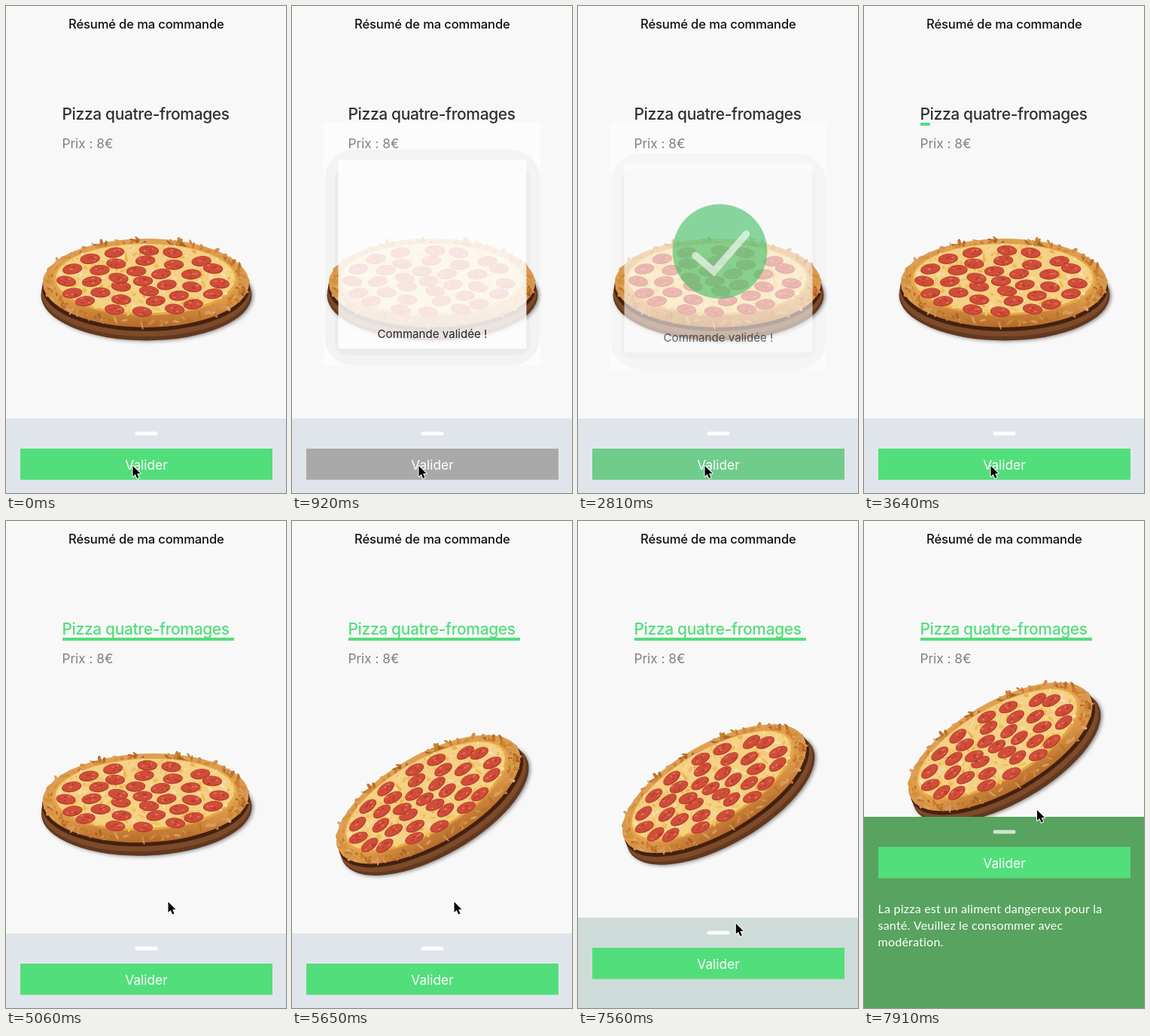
Recreate the animation shown at these times as an HTML page with a canvas. Size 372 by 647 pixels, loop 8 s.

```html
<!DOCTYPE html>
<html lang="fr">
<head>
<meta charset="utf-8">
<title>Résumé de ma commande</title>
<style>
html, body { margin: 0; width: 100%; height: 100%; overflow: hidden; background: #f8f8f8; }
canvas { display: block; }
</style>
</head>
<body>
<canvas id="stage" width="372" height="647"></canvas>
<script>
const ctx = document.getElementById('stage').getContext('2d');
const LOOP = 8000, STEP = 118, LAST_TICK = 67, MAX_LIFT = 155;
const GREEN = [82, 222, 122], GRAY = [169, 169, 169];
const UI = 'Inter, "Liberation Sans", sans-serif';
const TAU = Math.PI * 2;

const clamp = x => Math.max(0, Math.min(1, x));
const ramp = (k, a, b) => clamp((k - a) / (b - a));
const smooth = (k, a, b) => { const x = ramp(k, a, b); return x * x * (3 - 2 * x); };
const mix = (a, b, p) => `rgb(${a.map((v, i) => Math.round(v + (b[i] - v) * p))})`;

function seeded(seed) {
  return () => (seed = (seed * 16807) % 2147483647) / 2147483647;
}

function text(str, x, y, font, color, { align = 'left', spacing = 0 } = {}) {
  ctx.font = font;
  ctx.letterSpacing = spacing + 'px';
  ctx.textAlign = align;
  ctx.fillStyle = color;
  ctx.fillText(str, x, y);
}

function rect(x, y, w, h, color, radius = 0) {
  ctx.fillStyle = color;
  ctx.beginPath();
  ctx.roundRect(x, y, w, h, radius);
  ctx.fill();
}

function ellipse(x, y, rx, ry, color, turn = 0) {
  ctx.fillStyle = color;
  ctx.beginPath();
  ctx.ellipse(x, y, rx, ry, turn, 0, TAU);
  ctx.fill();
}

function drawBoard() {
  ctx.save();
  ctx.shadowColor = 'rgba(0,0,0,.45)';
  ctx.shadowBlur = 5;
  ctx.shadowOffsetX = 2;
  ctx.shadowOffsetY = 1;
  ellipse(186.5, 384, 140, 60.5, '#63381f');
  ctx.restore();
  ellipse(186, 381, 139, 58, '#7d4a2a');
  ellipse(186, 374, 138, 58, '#43210f');
}

function drawCrust(rnd) {
  const crust = ctx.createLinearGradient(0, 309, 0, 427);
  crust.addColorStop(0, '#e0a050');
  crust.addColorStop(0.7, '#dc9848');
  crust.addColorStop(1, '#b56a2a');
  ellipse(186, 368, 137, 59, crust);
  for (let i = 0; i < 170; i++) {
    const a = rnd() * TAU, r = 0.88 + rnd() * 0.11;
    const color = `hsl(${26 + rnd() * 9}, 62%, ${40 + rnd() * 24}%)`;
    ellipse(186 + 137 * r * Math.cos(a), 367 + 59 * r * Math.sin(a), 2 + rnd() * 4, 1 + rnd() * 1.5, color, rnd() * 3);
  }
}

function drawCheese(rnd) {
  ellipse(185, 363, 123, 48, '#e6a647');
  ellipse(185, 362, 119, 46, '#f4d183');
  for (let i = 0; i < 320; i++) {
    const a = rnd() * TAU, r = Math.sqrt(rnd());
    const color = `hsl(${34 + rnd() * 12}, 82%, ${60 + rnd() * 24}%)`;
    ellipse(185 + 118 * r * Math.cos(a), 362 + 46 * r * Math.sin(a), 1.5 + rnd() * 4, 0.8 + rnd() * 1.5, color, rnd() * 3);
  }
}

function drawSlice(x, y, rnd) {
  const turn = (rnd() - 0.5) * 0.3;
  ellipse(x, y + 0.5, 13.2, 6.9, '#b63a2a', turn);
  ellipse(x, y, 12.4, 6.1, '#cf4d39', turn);
  for (let i = 0; i < 5; i++) {
    ellipse(x + (rnd() - 0.5) * 17, y + (rnd() - 0.5) * 8, 2, 1, i % 2 ? '#e0775a' : '#b93c2c');
  }
}

function drawPizza(angle, shift) {
  const rnd = seeded(421);
  ctx.save();
  ctx.translate(187, 378 + shift);
  ctx.rotate(angle);
  ctx.translate(-187, -378);
  drawBoard();
  drawCrust(rnd);
  drawCheese(rnd);
  // Pepperoni in concentric rings: 1, 6, 11, 16.
  for (let ring = 0; ring <= 3; ring++) {
    const count = 1 + ring * 5;
    for (let i = 0; i < count; i++) {
      const a = (i + (rnd() - 0.5) * 0.3) / count * TAU + ring * 0.4;
      drawSlice(182 + 34 * ring * Math.cos(a), 365 + 13.6 * ring * Math.sin(a), rnd);
    }
  }
  ctx.restore();
}

function drawCheck(k) {
  if (k < 13) return;
  const scale = 1.54 * smooth(k, 12, 15) - 0.54 * smooth(k, 15, 19);
  ctx.save();
  ctx.translate(188.5, 338);
  ctx.scale(scale, scale);
  ellipse(0, 0, 62.8, 62.8, '#3dbf5f');
  const drawn = smooth(k, 14, 20) * 100;
  if (drawn > 0) {
    ctx.strokeStyle = '#fff';
    ctx.lineWidth = 9.5;
    ctx.lineCap = 'round';
    ctx.setLineDash([drawn, 200]);
    ctx.beginPath();
    ctx.moveTo(-32.5, 5.5);
    ctx.lineTo(-8, 26.5);
    ctx.lineTo(35, -23);
    ctx.stroke();
  }
  ctx.restore();
}

// Drop and fade of the confirmation card, null while it is hidden.
function cardAt(k) {
  if (k < 6 || k >= 27) return null;
  const leaving = ramp(k, 22, 27), n = k - 6;
  return {
    y: Math.round(221 - 53 * 0.57 ** n - 73 * leaving ** 2),
    alpha: (1 - 0.6 * 0.5 ** n) * (1 - leaving)
  };
}

function drawCardShadow({ y, alpha }) {
  ctx.save();
  ctx.globalAlpha = alpha;
  rect(42, 154, 288, y + 120, 'rgba(255,255,255,.55)');
  rect(43.5, y - 13, 286, 287, 'rgba(0,0,0,.04)', 38);
  rect(57, y + 8, 259, 252, 'rgba(0,0,0,.03)', 16);
  ctx.restore();
}

function drawCard({ y, alpha }, k) {
  ctx.save();
  ctx.globalAlpha = alpha;
  rect(61.5, y, 250, 251, '#fff');
  ctx.translate(0, y - 221);
  drawCheck(k);
  text('Commande validée !', 186.5, 457.5, `400 15.1px ${UI}`, '#000', { align: 'center' });
  ctx.restore();
}

function drawTitles(k) {
  text('Résumé de ma commande', 83, 29.5, `500 16.6px ${UI}`, '#111', { spacing: -0.14 });
  text('Prix : 8€', 74.5, 189, `400 17.2px ${UI}`, '#808080');
  const color = mix([48, 48, 50], GREEN, ramp(k, 37, 40));
  text('Pizza quatre-fromages', 74.5, 151, `500 21px ${UI}`, color, { spacing: -0.36 });
  rect(75, 155, 228 * smooth(k, 30, 37), 4, mix(GREEN, GREEN, 0));
}

function drawSheet(k, p) {
  const top = 548 - Math.round(MAX_LIFT * p);
  rect(0, top, 372, 647 - top, mix([224, 229, 236], [87, 163, 95], p));
  rect(171.5, top + 17.5, 30, 5, `rgba(255,255,255,${0.9 - 0.18 * p})`, 2.5);

  const disabled = ramp(k, 5, 7) - ramp(k, 22, 25);
  ctx.save();
  ctx.globalAlpha = 1 - 0.4 * Math.sin(Math.PI * ramp(k, 0, 4));
  rect(19, top + 40, 335, 41.5, mix(GREEN, GRAY, disabled));
  text('Valider', 186.5, top + 67.5, `400 17.3px ${UI}`, '#fff', { align: 'center' });
  ctx.globalAlpha = p;
  ['La pizza est un aliment dangereux pour la', 'santé. Veuillez le consommer avec', 'modération.']
    .forEach((line, i) => text(line, 18.5, top + 127.5 + 22 * i,
      '400 16px Lato, "Open Sans", sans-serif', '#fff', { spacing: 0.23 }));
  ctx.restore();
}

// The pointer leaves the button, swings down to the handle, then drags it up.
function cursorAt(k, p) {
  const leave = smooth(k, 31, 37), swing = smooth(k, 54, 60), drag = ramp(k, 62, LAST_TICK);
  const bend = Math.sin(Math.PI * swing);
  return [
    168.5 + 47 * leave - 12.5 * swing - 58 * bend + 27 * drag ** 1.5,
    611 - 105 * leave + 52 * swing + 48 * bend - 174 * p
  ];
}

function drawCursor(x, y) {
  const outline = [[0, 0], [0, 14], [3.2, 11], [5.6, 16.6], [8, 15.6], [5.6, 10.2], [10, 10]];
  ctx.save();
  ctx.translate(x, y);
  ctx.beginPath();
  outline.forEach(([px, py]) => ctx.lineTo(px, py));
  ctx.closePath();
  ctx.lineJoin = 'round';
  ctx.lineWidth = 2;
  ctx.strokeStyle = '#fff';
  ctx.stroke();
  ctx.fillStyle = '#000';
  ctx.fill();
  ctx.restore();
}

function render(ms) {
  // The picture advances in fixed ticks, as in a low-rate screen capture.
  const k = Math.min(LAST_TICK, Math.floor((ms % LOOP + 30) / STEP));
  const pulled = ramp(k, 62, LAST_TICK) ** 2.2;
  const card = cardAt(k);
  rect(0, 0, 372, 647, '#f8f8f8');
  if (card) drawCardShadow(card);
  drawPizza(-Math.PI / 6 * smooth(k, 42, 48), -70 * pulled ** 0.79);
  if (card) drawCard(card, k);
  drawTitles(k);
  drawSheet(k, pulled);
  drawCursor(...cursorAt(k, pulled));
}

const start = performance.now();
function loop() {
  render(performance.now() - start);
  requestAnimationFrame(loop);
}
loop();
</script>
</body>
</html>
```
